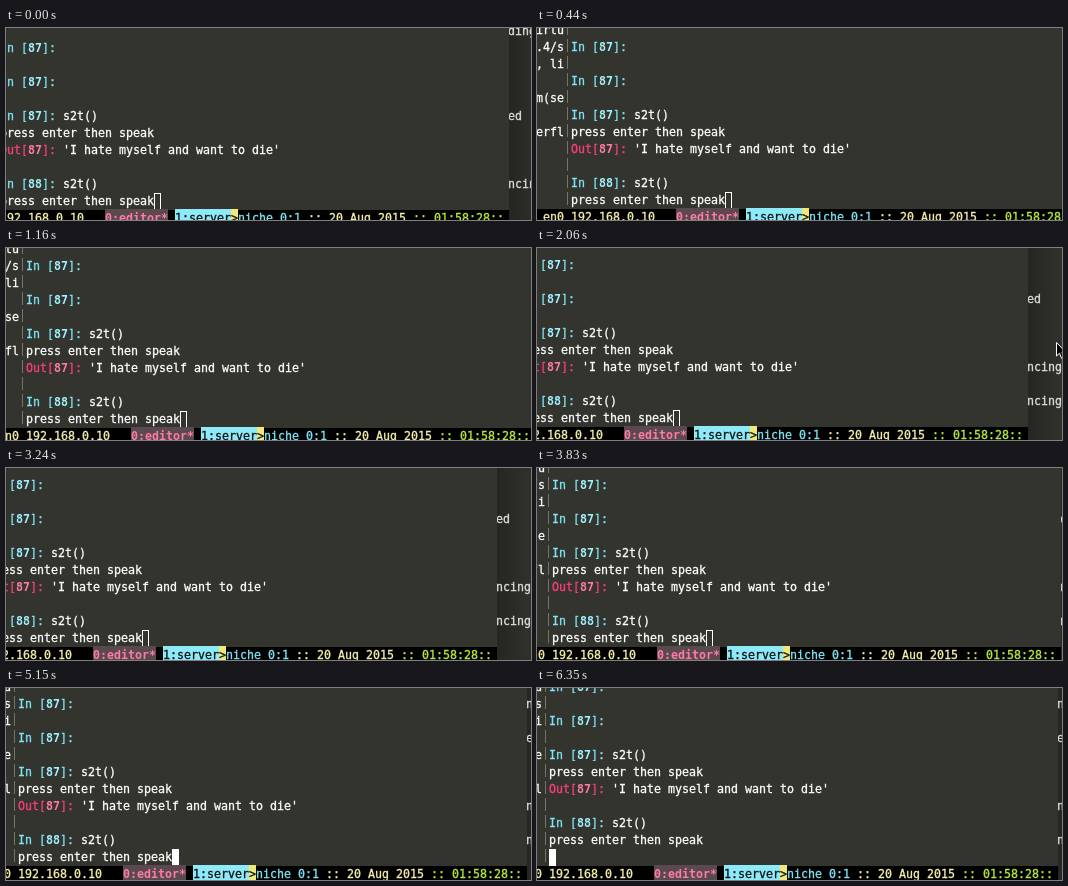
Animation, 525 px wide and 192 px high, one loop 8000 ms. Source, as an HTML page:

```html
<!DOCTYPE html>
<html lang="en">
<head>
<meta charset="utf-8">
<title>Terminal session</title>
<style>
html, body { margin: 0; width: 100%; height: 100%; overflow: hidden; background: #30302b; }
#stage { position: relative; width: 525px; height: 192px; overflow: hidden; }
#world, #world * , #mouse { position: absolute; }
#world span, #world b { position: static; }
pre { margin: 0; font: 11.63px/17px "DejaVu Sans Mono", monospace; color: #fff; -webkit-text-stroke: .3px; }
b { -webkit-text-stroke: 0; }
#back { left: 508px; top: -40px; width: 80px; height: 260px;
  background: linear-gradient(90deg, #252521, #30302b 30px); }
#back pre { left: 0; color: #dededa; }
#term { left: -100px; top: -40px; width: 609px; height: 260px; overflow: hidden; background: #33342d; }
#left { right: 516px; top: 23px; text-align: right; }
#rule { left: 96px; top: 6px; width: 1px; height: 220px;
  background: repeating-linear-gradient(#74746b 0 13px, transparent 13px 17px); }
#main { left: 100px; }
#cursor { box-sizing: border-box; width: 7px; height: 17px; border: 1px solid #fff; }
#bar { left: 0; top: 210px; width: 609px; height: 18px; background: #000; }
#bar pre { left: 58px; }
.c { color: #7fe4f5; }
b.c { color: #a0f1ff; }
.p { color: #fa3c80; }
b.p { color: #ff7aa6; }
.y { color: #f4efaa; }
.g { color: #b5e83c; }
.last { background: #5a4a4f; }
.tab { color: #111; background: #8deaf8; }
.end { color: #111; background: #f2e77a; }
#bar span, #bar b { padding: 2px 0; }
</style>
</head>
<body>
<div id="stage">
  <div id="world">
    <div id="back"></div>
    <div id="term">
      <pre id="left">virtu
3.4/s
", li

am(se

verfl</pre>
      <div id="rule"></div>
      <pre id="main"></pre>
      <div id="cursor"></div>
      <div id="bar"><pre><span class="y">2 en0 192.168.0.10</span>   <b class="p last">0:editor*</b> <span class="tab">1:server</span><span class="end">&gt;</span><span class="c">niche 0:1</span> <span class="y">:: 20 Aug 2015</span> <span class="g">:: 01:58:28::</span></pre></div>
    </div>
  </div>
  <svg id="mouse" width="14" height="20"><path d="M.5 .5V14l3-2.8 2.2 5.3 2.4-1-2.2-5H10z" fill="#000" stroke="#fff"/></svg>
</div>
<script>
const $ = id => document.getElementById(id);
const LINE = 17, TOP = 40, LOOP = 8000;
const FOCUS = 5150, ENTER = 6350, HOVER = 2200, LEAVE = 3240;

// [start ms, x, y], each held until the next
const camera = [
  [0, -6, 12], [300, 14, 12], [440, 34, 11], [730, 39, 10], [880, 41, 10],
  [1020, 32, 10], [1160, 20, 10], [1310, -6, 9], [1460, -18, 9],
  [3680, 2, 9], [3830, 15, 9], [3970, 16, 9], [4120, 14, 8], [4260, 12, 8]
];
const pointer = [
  [2060, 519, 94], [2200, 519, 91], [2350, 520, 90], [2500, 521, 90], [3090, 518, 89]
];
const at = (track, t) => track.findLast(k => k[0] <= t);

const prompt = (label, n, color) =>
  `<span class="${color}">${label}[<b class="${color}">${n}</b>]:</span> `;
const idle = prompt("In ", 87, "c");
$("main").innerHTML = [
  idle, "", idle, "",
  idle + "s2t()",
  "press enter then speak",
  prompt("Out", 87, "p") + "'I hate myself and want to die'",
  "",
  prompt("In ", 88, "c") + "s2t()",
  "press enter then speak"
].join("\n");

function behind(text, row) {
  const line = document.createElement("pre");
  line.textContent = text;
  line.style.top = TOP + row * LINE + "px";
  $("back").append(line);
  return line;
}
const before = [behind("ding", -1), behind("ed", 4), behind("ncing", 8)];
const after = [behind("ed", 2), behind("ncing", 6), behind("ncing", 8)];
const extra = behind("ncing", 0);
const show = (el, on) => el.style.visibility = on ? "visible" : "hidden";

function draw(now) {
  const t = now % LOOP;
  const [, x, y] = at(camera, t);
  $("world").style.transform = `translate(${x}px, ${y}px)`;

  const scrolled = t >= 880, entered = t >= ENTER;
  before.forEach(el => show(el, !scrolled));
  after.forEach(el => show(el, scrolled));
  show(extra, t >= FOCUS || (t >= HOVER && t < LEAVE));

  $("main").style.top = TOP - (entered ? LINE : 0) + "px";
  const cursor = $("cursor").style;
  cursor.left = 100 + (entered ? 0 : 154) + "px";
  cursor.top = TOP + 9 * LINE + "px";
  cursor.background = t >= FOCUS ? "#fff" : "none";

  const tip = at(pointer, t);
  show($("mouse"), tip && t < LEAVE);
  if (tip) $("mouse").style.transform = `translate(${tip[1]}px, ${tip[2]}px)`;
  requestAnimationFrame(draw);
}
requestAnimationFrame(draw);
</script>
</body>
</html>
```
